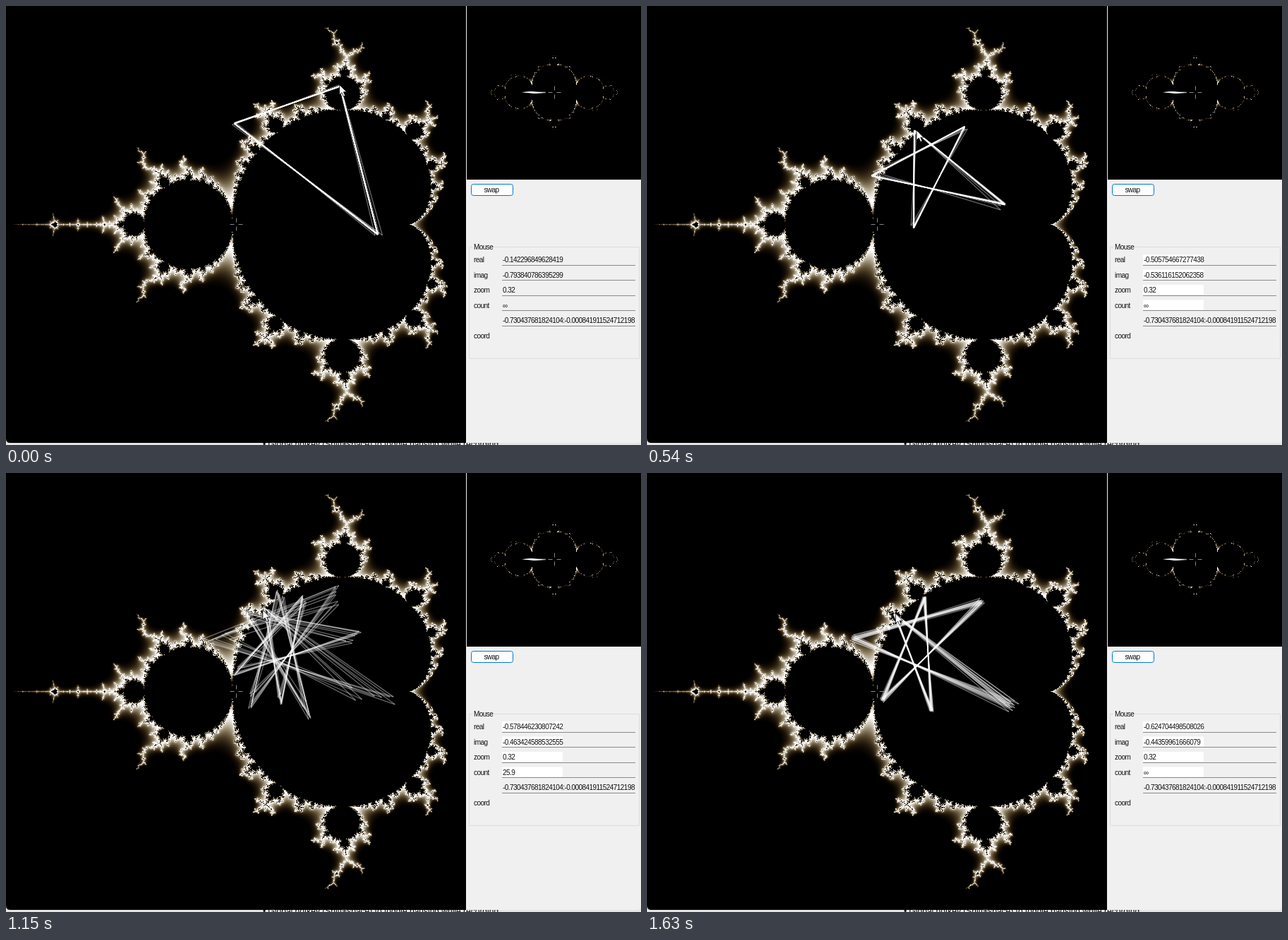
These frames come from a looping animation (900x622 px, 2.46 s). An HTML page with a canvas:

```html
<!DOCTYPE html>
<html lang="en">
<head>
<meta charset="utf-8">
<title>Fractal orbit viewer</title>
<style>
  html, body { margin: 0; width: 900px; height: 622px; overflow: hidden; background: #e4e4e4; }
  canvas, svg { position: absolute; left: 0; top: 0; display: block; }
  text { font: 10px "Liberation Sans", Arial, sans-serif; letter-spacing: -.55px; fill: #111; }
  .hint { font-size: 12px; letter-spacing: 0; }
</style>
</head>
<body>
<svg width="900" height="622">
  <text class="hint" x="364" y="625">• Global hotkey (Shift+space) to toggle pausing while recording</text>
  <path d="M652 0H900V613q0 6 -6 6H652z" fill="#f0f0f0"/>
  <rect x="659.5" y="252.5" width="59" height="16" rx="3" fill="#fdfdfd" stroke="#0078d4"/>
  <text x="688" y="264" text-anchor="middle">swap</text>
  <path d="M661 341.5H656.5V499.5H897.5V341.5H691" fill="none" stroke="#dcdcdc"/>
  <text x="663" y="345">Mouse</text>
  <g id="rows"></g>
  <text x="663" y="470.5">coord</text>
</svg>
<canvas width="900" height="622"></canvas>
<script>
const W = 652, H = 619, LOOP = 2460;
const STEP = 0.006608323957254888;
const HOME = [-0.142296849628419, -0.793840786395299];
const CENTER = [-0.730437681824104, -0.000841911524712198];
const MAIN = { x: 0, y: 0, w: W, h: H, cx: 326, cy: 309.5, scale: 249.5, at: CENTER };
const JULIA = { x: 653, y: 0, w: 247, h: 246, cx: 777, cy: 122.5, scale: 61.8, at: [0, 0], seed: CENTER };

// time, mouse steps left and down from HOME, and the steps in the text if it runs ahead
const PATH = [
  [0, 0, 0], [180, 8, 5, 14, 9], [240, 22, 15, 30, 20], [300, 36, 25, 44, 30],
  [360, 48, 33, 50, 36], [420, 53, 39], [480, 54, 40], [540, 55, 39], [660, 55, 38],
  [720, 54, 38], [780, 54, 37], [1030, 56, 39, 58, 41], [1090, 61, 44, 62, 46],
  [1150, 65, 48, 66, 50], [1210, 69, 50], [1270, 72, 51], [1330, 73, 52],
  [1390, 74, 54], [1570, 73, 54], [1630, 73, 53]
];

const canvas = document.querySelector('canvas');
const ctx = canvas.getContext('2d');
const point = (left, down) => [HOME[0] - left * STEP, HOME[1] + down * STEP];
const toPixel = (v, z) => [v.cx + (z[0] - v.at[0]) * v.scale, v.cy + (z[1] - v.at[1]) * v.scale];

// Smooth escape count, Infinity for points that stay bounded
function escape(x, y, a, b, n) {
  for (; n < 250; n++) {
    const xx = x * x, yy = y * y;
    if (xx + yy > 256) return n - Math.log2(Math.log2(xx + yy) / 2);
    y = 2 * x * y + b;
    x = xx - yy + a;
  }
  return Infinity;
}

// Black below 7, then waves between black and white, one per tenfold count
function shade(n) {
  return n === Infinity || n < 7 ? 0 : (1 - Math.cos(2 * Math.PI * Math.log10(n / 7))) / 2;
}

function paintFractal(v) {
  const img = ctx.createImageData(v.w, v.h);
  for (let j = 0, i = 0; j < v.h; j++) {
    for (let k = 0; k < v.w; k++, i += 4) {
      const a = v.at[0] + (v.x + k + .5 - v.cx) / v.scale;
      const b = v.at[1] + (v.y + j + .5 - v.cy) / v.scale;
      const t = shade(v.seed ? escape(a, b, ...v.seed, 0) : escape(a, b, a, b, 1));
      img.data[i] = 255 * t ** .9;
      img.data[i + 1] = 255 * t ** 1.05;
      img.data[i + 2] = 255 * t ** 1.4;
      img.data[i + 3] = 255;
    }
  }
  ctx.putImageData(img, v.x, v.y);
}

function drawCross(v) {
  ctx.strokeStyle = '#888';
  ctx.lineWidth = 1;
  ctx.beginPath();
  const x = Math.floor(v.cx) + .5, y = Math.floor(v.cy) + .5;
  for (const s of [-1, 1]) {
    ctx.moveTo(x + 3 * s, y); ctx.lineTo(x + 9 * s, y);
    ctx.moveTo(x, y + 3 * s); ctx.lineTo(x, y + 9 * s);
  }
  ctx.stroke();
}

// Each segment is stroked alone so that repeated paths grow brighter
function drawOrbit(v, c) {
  ctx.save();
  ctx.beginPath();
  ctx.rect(v.x, v.y, v.w, v.h);
  ctx.clip();
  ctx.strokeStyle = 'rgba(255,255,255,.4)';
  ctx.lineWidth = 1.3;
  let [x, y] = c;
  for (let i = 1; i < 100 && x * x + y * y <= 4; i++) {
    ctx.beginPath();
    ctx.moveTo(...toPixel(v, [x, y]));
    [x, y] = [x * x - y * y + c[0], 2 * x * y + c[1]];
    ctx.lineTo(...toPixel(v, [x, y]));
    ctx.stroke();
  }
  ctx.restore();
}

const arrow = new Path2D('M0 0V14L3.3 11L5.6 16.5L8 15.5L5.7 10.2H10z');
function drawCursor(c) {
  ctx.save();
  ctx.translate(...toPixel(MAIN, c));
  ctx.fillStyle = '#fff';
  ctx.strokeStyle = '#000';
  ctx.lineWidth = .8;
  ctx.fill(arrow);
  ctx.stroke(arrow);
  ctx.restore();
}

const rows = document.getElementById('rows');
rows.innerHTML = ['real', 'imag', 'zoom', 'count', ''].map((name, i) => {
  const y = 363 + i * 21.5;
  return `<text x="663" y="${y}">${name}</text>` +
    (name ? `<rect class="fill" x="703" y="${y - 11}" width="86" height="14" fill="#fff"/>` : '') +
    `<path d="M703 ${Math.floor(y + 4) + .5}H892" stroke="#8a8a8a"/>` +
    `<text class="value" x="704" y="${y}"></text>`;
}).join('');
const values = rows.querySelectorAll('.value');
const fills = rows.querySelectorAll('.fill');
values[2].textContent = '0.32';
values[4].textContent = CENTER.join(':');

paintFractal(MAIN);
paintFractal(JULIA);
drawOrbit(JULIA, CENTER);
drawCross(MAIN);
drawCross(JULIA);
// Rounded lower left corner of the window
ctx.globalCompositeOperation = 'destination-out';
ctx.fill(new Path2D('M0 613q0 6 6 6H0z'));
ctx.globalCompositeOperation = 'source-over';
const back = document.createElement('canvas');
back.width = 900;
back.height = 622;
back.getContext('2d').drawImage(canvas, 0, 0);

const start = performance.now();
let shown;
function frame(now) {
  const t = Math.max(0, now - start) % LOOP;
  const state = PATH.findLast(p => p[0] <= t);
  if (state !== shown) {
    shown = state;
    const [time, left, down, textLeft = left, textDown = down] = state;
    const mouse = point(textLeft, textDown);
    ctx.clearRect(0, 0, 900, 622);
    ctx.drawImage(back, 0, 0);
    drawOrbit(MAIN, point(left, down));
    drawCursor(mouse);
    mouse.forEach((n, i) => values[i].textContent = +n.toPrecision(15));
    const n = escape(...mouse, ...mouse, 1);
    values[3].textContent = n === Infinity ? '∞' : n.toFixed(1);
    fills.forEach(f => f.style.opacity = time ? 1 : 0);
  }
  requestAnimationFrame(frame);
}
frame(start);
</script>
</body>
</html>
```
